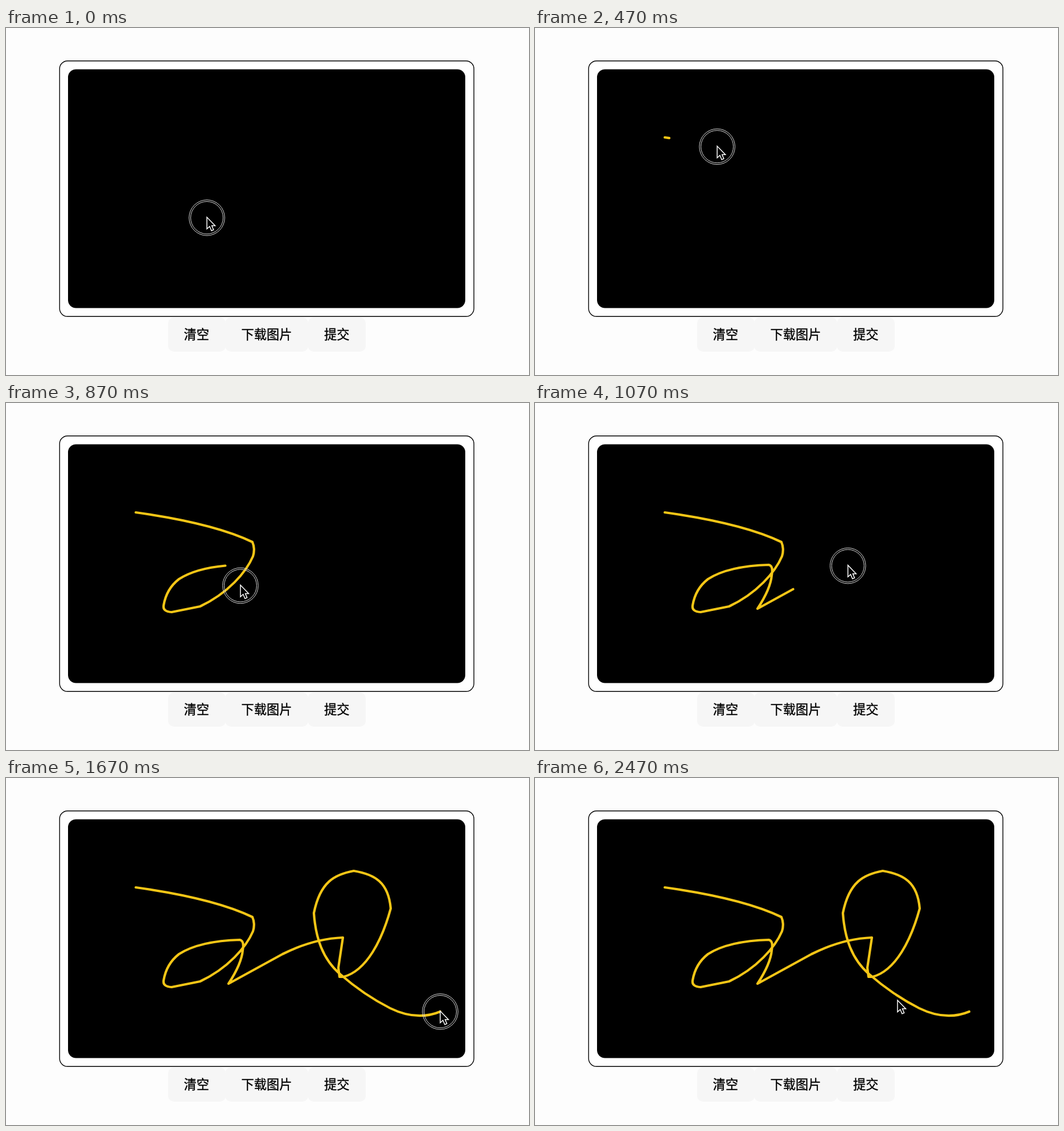
An HTML page for the animation above (2.54 s loop, 919 px wide and 609 px high).

```html
<!DOCTYPE html>
<html lang="zh-CN">
<head>
<meta charset="utf-8">
<title>画板</title>
<style>
  html, body { margin: 0; width: 100%; height: 100%; overflow: hidden; background: #fdfdfd; }
  svg { display: block; }
  text {
    font: 500 22.3px "Noto Sans CJK SC", "Noto Sans CJK", sans-serif;
    text-anchor: middle; stroke: #000; stroke-width: .35px;
  }
</style>
</head>
<body>
<svg width="919" height="609" viewBox="0 0 919 609">
  <g fill="#f6f6f6">
    <rect x="285" y="508" width="101" height="60" rx="10"/>
    <rect x="385" y="508" width="146" height="60" rx="10"/>
    <rect x="530.5" y="508" width="101.5" height="60" rx="10"/>
  </g>
  <text x="334.7" y="546">清空</text>
  <text x="458" y="546">下载图片</text>
  <text x="581.3" y="546">提交</text>
  <rect x="94.2" y="57.7" width="728" height="448.6" rx="14" fill="#fff" stroke="#000" stroke-width="1.4"/>
  <rect x="109" y="72.5" width="698" height="419" rx="14"/>
  <path id="ink" pathLength="1" fill="none" stroke="#f5c616" stroke-width="4.2" stroke-linecap="round" stroke-linejoin="round"
    d="M228 192C285 200 375 216 433 244Q438 256 434 269C422 297 390 334 341 357L291 367
       Q275 366 277 355Q282 326 304 309Q340 286 411 284Q419 286 416 302Q414 326 391 361
       L486 309Q540 282 592 280L584 333 586 349H593C634 338 661 284 676 229
       C672 183 648 169 611 163C578 169 552 182 541 237C544 280 556 318 588 345
       Q628 380 675 404Q722 427 763 410"/>
  <g id="pointer" fill="none" stroke="#fff">
    <g id="ring" stroke="#d8d8d8">
      <circle r="31.3"/>
      <circle r="28.5"/>
    </g>
    <path d="M0-1V19.5L4.8 15.2 8 22.8 11.7 21.2 8.6 14H14.5Z" fill="#000" stroke-width="1.5"/>
  </g>
</svg>
<script>
const LOOP = 2540, STEPS = 38;
const PRESS = 5, RELEASE = 25; // steps between which the pen is down

// Pen speed changes: [step, share of the stroke under the pen, share inked so far]
const pace = [[PRESS, 0, 0], [7, .056, .005], [10, .254, .239], [16, .52, .457], [21, .744, .715], [RELEASE, 1, 1]];

const [ink, pointer, ring] = ['ink', 'pointer', 'ring'].map(id => document.getElementById(id));
const length = ink.getTotalLength();
const mix = (a, b, u) => a.map((v, i) => v + (b[i] - v) * u);
const curve = (a, b, c, u) => mix(mix(a, b, u), mix(b, c, u), u);
const show = (el, on) => el.setAttribute('visibility', on ? 'visible' : 'hidden');

function onStroke(share) {
  const { x, y } = ink.getPointAtLength(share * length);
  return [x, y];
}

function paceAt(step) {
  const next = pace.findIndex(key => key[0] >= step);
  if (next < 0) return [1, 1];
  if (next === 0) return [0, 0];
  const a = pace[next - 1], b = pace[next];
  return mix(a, b, (step - a[0]) / (b[0] - a[0])).slice(1);
}

function penAt(step, share) {
  if (step < PRESS) return mix([353, 333], onStroke(0), step / PRESS);
  if (step <= RELEASE) return onStroke(share);
  return curve(onStroke(1), [654, 461], [637, 391], (step - RELEASE) / (STEPS - 1 - RELEASE));
}

function draw(now) {
  // 15 steps per second, starting on whole hundredths of a second
  const step = Math.floor((Math.floor(now % LOOP / 10) + 0.5) * 0.15);
  const [share, inked] = paceAt(step);
  ink.setAttribute('stroke-dasharray', `${inked} 2`);
  pointer.setAttribute('transform', `translate(${penAt(step, share)})`);
  show(ink, inked > 0);
  show(ring, step <= RELEASE);
  requestAnimationFrame(draw);
}
draw(performance.now());
</script>
</body>
</html>
```
